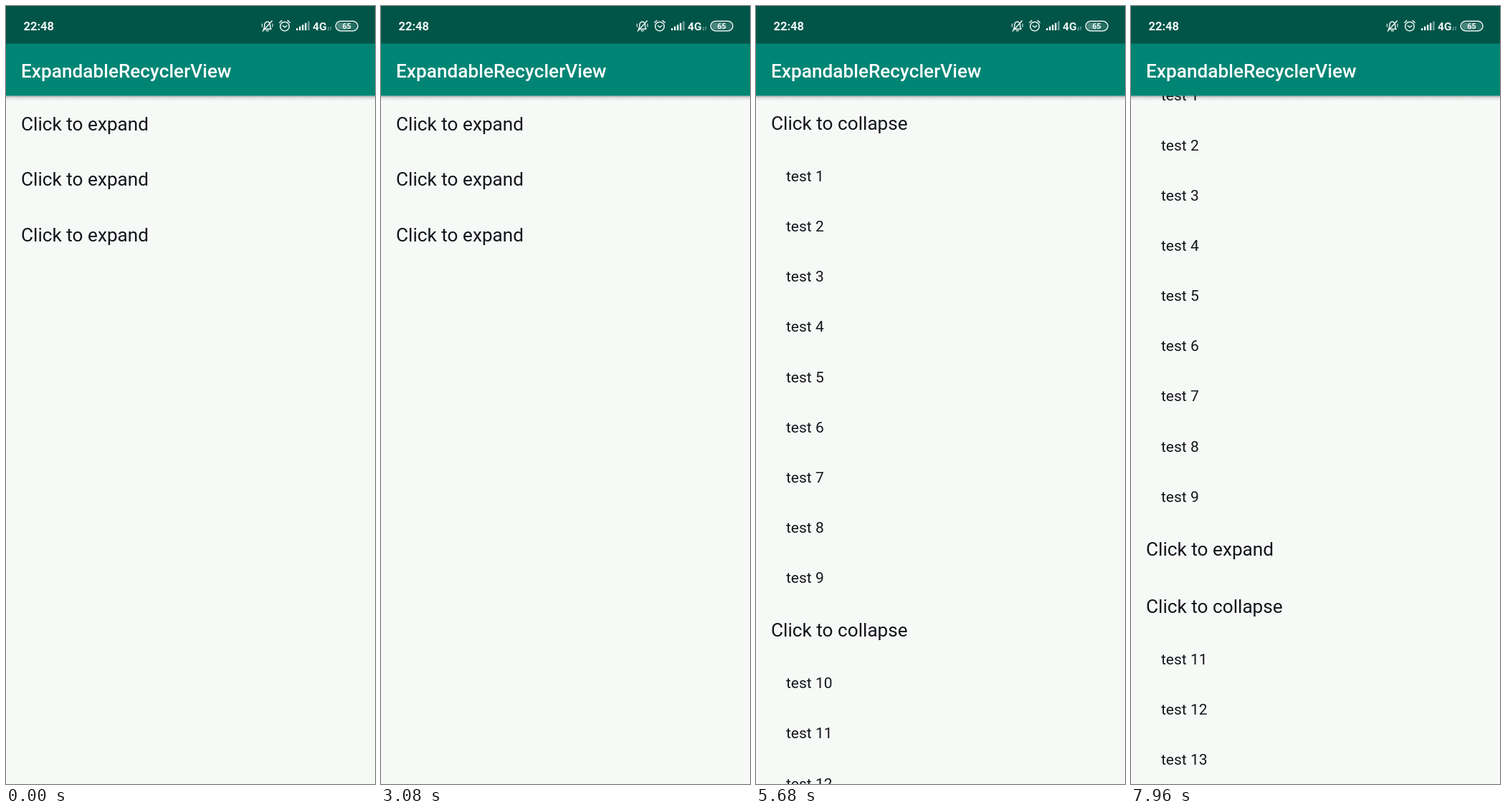
These frames come from a looping animation (515x1087 px, 8 s). An HTML page:

```html
<!DOCTYPE html>
<html lang="en">
<head>
<meta charset="utf-8">
<title>ExpandableRecyclerView</title>
<style>
  html, body { margin: 0; width: 100%; height: 100%; overflow: hidden; background: #f7f9f7; }
  svg { display: block; width: 515px; height: 1087px; font-family: Roboto, sans-serif; }
  #list { fill: #13151b; }
  .header { font-size: 26.2px; }
  .child { font-size: 21px; }
</style>
</head>
<body>
<svg viewBox="0 0 515 1087">
  <defs>
    <linearGradient id="shadow" x2="0" y2="1">
      <stop offset="0" stop-color="#000" stop-opacity=".32"/>
      <stop offset=".4" stop-color="#000" stop-opacity=".1"/>
      <stop offset="1" stop-color="#000" stop-opacity="0"/>
    </linearGradient>
  </defs>
  <rect width="515" height="1087" fill="#f7f9f7"/>
  <g id="list"></g>
  <ellipse id="glow" cx="288" rx="618" fill="#008577"/>

  <rect y="125.5" width="515" height="7" fill="url(#shadow)"/>
  <rect width="515" height="125.5" fill="#008575"/>
  <rect width="515" height="52.5" fill="#005548"/>
  <text x="21" y="99.5" font-size="26.2" font-weight="500" fill="#fff">ExpandableRecyclerView</text>

  <g fill="#eef6f4" font-weight="700">
    <text x="24.5" y="34" font-size="16.5">22:48</text>
    <text x="428" y="34" font-size="15.5">4G</text>
    <path d="M405 31h2.4v3h-2.4zM409 28.6h2.4v5.4h-2.4zM413 26.2h2.4v7.8h-2.4zM417 23.8h2.4v10.2h-2.4z"/>
    <path d="M421.2 21.4h2.4v12.6h-2.4z" opacity=".5"/>
    <path d="M450 29v5m-1.2-1.3 1.2 1.3M453 34v-5m1.2 1.3-1.2-1.3" stroke="#eef6f4" fill="none" opacity=".55"/>
    <rect x="462" y="23.3" width="18" height="9.6" rx="4" opacity=".3"/>
    <rect x="480" y="23.3" width="9" height="9.6" rx="4" opacity=".15"/>
    <text x="475.5" y="32" font-size="11" text-anchor="middle">65</text>
  </g>
  <g fill="none" stroke="#eef6f4" stroke-width="1.5" stroke-linecap="round" stroke-linejoin="round">
    <rect x="460.2" y="21.3" width="30.8" height="13.4" rx="6.7"/>
    <circle cx="389" cy="28.5" r="6.3"/>
    <path d="M386.3 27.5l2.7 2.3 2.9-2.3M381.8 23.2l3-2.8M396.2 23.2l-3-2.8"/>
    <path d="M359.5 32.3c1.8-2 1-5.3 1.6-7.3 1.4-4 5.8-4 7.2 0 .6 2 0 5.3 1.7 7.3zM363.3 34.6h3M358.3 35l13-14.3"/>
    <path d="M357.4 25v4M372 25v4" stroke-width="1.1"/>
  </g>
</svg>
<script>
const LOOP = 8000, STEP = 40, STAGE_H = 1087;
const TOP = 125.5, HEADER_H = 77.3, CHILD_H = 70.1;
const MOVE = 250, FADE = 120, LAYOUT_DELAY = 8;

// Each group toggles open and closed at the given times.
const groups = [
  { first: 1, count: 9, toggles: [4920] },
  { first: 10, count: 3, toggles: [1720, 2680, 3320, 7600] },
  { first: 11, count: 3, toggles: [4080], last: true },
];

const list = document.getElementById('list');
const glow = document.getElementById('glow');
const clamp = v => Math.min(1, Math.max(0, v));
const ease = v => (1 - Math.cos(Math.PI * clamp(v))) / 2;

function addText(kind, x, label) {
  const el = document.createElementNS('http://www.w3.org/2000/svg', 'text');
  el.setAttribute('class', kind);
  el.setAttribute('x', x);
  el.textContent = label;
  return list.appendChild(el);
}

for (const g of groups) {
  g.header = addText('header', 21, '');
  g.children = Array.from({ length: g.count }, (_, i) => addText('child', 42, 'test ' + (g.first + i)));
}

// Opening makes room and then fades in; closing fades out and then moves up.
function groupState(g, t) {
  const past = g.toggles.filter(time => time <= t);
  const open = past.length % 2 === 1;
  const dt = past.length ? t - past[past.length - 1] - LAYOUT_DELAY : Infinity;
  if (!open) return { open, alpha: 1 - ease(dt / FADE), space: 1 - ease((dt - FADE) / MOVE) };
  return { open, alpha: ease((dt - (g.last ? 0 : MOVE)) / FADE), space: ease(dt / MOVE) };
}

function drawGlow(t) {
  const amount = t < 6880 ? ease((t - 6240) / 600) : (1 - clamp((t - 6880) / 500)) ** 2;
  const ry = 544 * amount;
  glow.setAttribute('ry', ry);
  glow.setAttribute('cy', STAGE_H - 64 * amount + ry);
  glow.setAttribute('opacity', 0.155 * amount);
}

function draw(t) {
  const states = groups.map(g => groupState(g, t));
  const content = groups.reduce((sum, g, i) => sum + HEADER_H + states[i].space * g.count * CHILD_H, TOP);
  const maxScroll = Math.max(0, content - STAGE_H);
  let y = TOP - Math.min(maxScroll, 322 * ease((t - 5660) / 580));

  groups.forEach((g, i) => {
    const { open, alpha, space } = states[i];
    g.header.textContent = open ? 'Click to collapse' : 'Click to expand';
    g.header.setAttribute('y', y + 48.5);
    y += HEADER_H;
    g.children.forEach((child, n) => {
      child.setAttribute('y', y + n * CHILD_H + 43.3);
      child.setAttribute('opacity', alpha);
    });
    y += space * g.count * CHILD_H;
  });
  drawGlow(t);
}

function tick() {
  const t = performance.now() % LOOP;
  draw(Math.floor(t / STEP) * STEP);
  requestAnimationFrame(tick);
}
tick();
</script>
</body>
</html>
```
